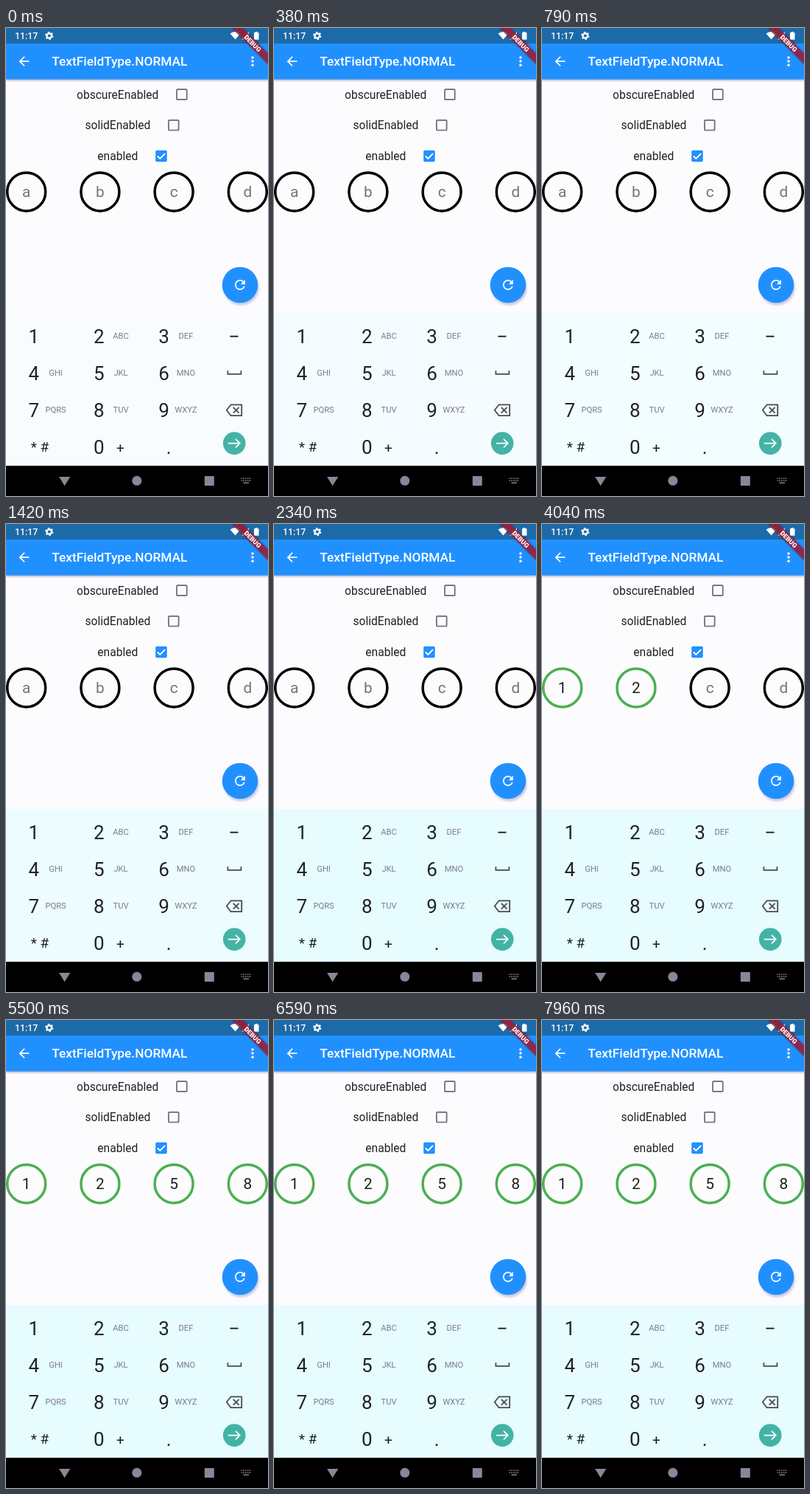
Recreate the animation shown at these times as an HTML page. Size 356 by 634 pixels, loop 8000 ms.

```html
<!DOCTYPE html>
<html lang="en">
<head>
<meta charset="utf-8">
<title>Code entry</title>
<style>
html, body { margin: 0; width: 100%; height: 100%; overflow: hidden; background: #fcfcff; }
svg { display: block; width: 100vw; height: 100vh; font-family: Roboto, sans-serif; fill: #212121; }
.mid { text-anchor: middle; }
.white { fill: #fff; }
.label { font-size: 15.59px; }
.box { fill: none; stroke: #69657c; stroke-width: 1.7; }
.line { fill: none; stroke: #fff; stroke-width: 1.8; }
.ring { fill: none; stroke-width: 3.46; }
.field { font-size: 20.8px; }
.digit { font-size: 26px; }
.letters { font-size: 11.2px; fill: #7c798b; }
.symbol { font-size: 19px; }
.key-icon { fill: none; stroke: #4c4a50; stroke-width: 1.8; }
.nav { fill: #88869a; }
#pad { animation: tint 8s linear infinite; }
@keyframes tint {
  0% { fill: #f8fcff; }
  10% { fill: #f2fdff; }
  25%, 100% { fill: #e6fcff; }
}
</style>
</head>
<body>
<svg viewBox="0 0 356 634">
  <defs>
    <filter id="soft" x="-30%" y="-30%" width="160%" height="160%"><feGaussianBlur stdDeviation="1.6"/></filter>
  </defs>
  <rect width="356" height="634" fill="#fcfcff"/>

  <!-- app bar -->
  <rect y="64" width="356" height="7" fill="#a9a6bd" filter="url(#soft)"/>
  <rect width="356" height="69.5" fill="#2190ff"/>
  <rect width="356" height="21" fill="#1d6aa8"/>
  <text class="white" x="12" y="14.8" font-size="12.3" font-weight="500">11:17</text>
  <g fill="none" stroke="#fff">
    <circle cx="58.7" cy="10.5" r="3.2" stroke-width="2.2"/>
    <circle cx="58.7" cy="10.5" r="4.8" stroke-width="1.6" stroke-dasharray="2.5 2.527"/>
  </g>
  <g class="white">
    <path d="M304.5 7.5Q311.5 2.5 318.5 7.5L311.5 15.5Z"/>
    <path d="M320 15.5L330 5V15.5Z"/>
    <path d="M337 6.2H338.7V5H341.6V6.2H343.5V15.8H337Z"/>
    <path transform="translate(14.1 34.8) scale(.866)" d="M20 11H7.83l5.59-5.59L12 4l-8 8 8 8 1.41-1.41L7.83 13H20z"/>
    <circle cx="335" cy="39.9" r="1.75"/><circle cx="335" cy="45.1" r="1.75"/><circle cx="335" cy="50.3" r="1.75"/>
    <text x="62.3" y="51.3" font-size="17.3" font-weight="500">TextFieldType.NORMAL</text>
  </g>
  <g transform="translate(356 0) rotate(45) scale(.866)">
    <rect x="-40" y="28" width="80" height="12" fill="#000" opacity=".35" filter="url(#soft)"/>
    <rect x="-40" y="28" width="80" height="12" fill="#a51f38" opacity=".82"/>
    <text class="mid white" y="37.6" font-size="10.2" font-weight="900">DEBUG</text>
  </g>

  <!-- options -->
  <g class="label">
    <text x="96" y="95.6">obscureEnabled</text>
    <text x="107.5" y="137.2">solidEnabled</text>
    <text x="124.3" y="178.8">enabled</text>
  </g>
  <rect class="box" x="232" y="83.2" width="13.7" height="13.7" rx="1"/>
  <rect class="box" x="220.9" y="124.8" width="13.7" height="13.7" rx="1"/>
  <rect x="203.2" y="165.7" width="15.5" height="15.5" rx="1.6" fill="#2190ff"/>
  <path class="line" d="M205.8 173.5L209.3 177L216 170.1"/>

  <g id="fields" class="mid field"></g>

  <!-- refresh button -->
  <circle cx="319.5" cy="351.5" r="24" fill="#c9c5e0" filter="url(#soft)"/>
  <circle cx="318" cy="348" r="24.3" fill="#2190ff"/>
  <path class="white" transform="translate(307.6 337.6) scale(.866)" d="M17.65 6.35C16.2 4.9 14.21 4 12 4c-4.42 0-7.99 3.58-7.99 8s3.57 8 7.99 8c3.73 0 6.84-2.55 7.73-6h-2.08c-.82 2.33-3.04 4-5.65 4-3.31 0-6-2.69-6-6s2.69-6 6-6c1.66 0 3.14.69 4.22 1.78L13 11h7V4z"/>

  <!-- keyboard -->
  <rect id="pad" y="386" width="356" height="207"/>
  <g id="keys" class="mid"></g>
  <g class="mid symbol">
    <text x="46" y="574.3">* #</text>
    <text x="155.5" y="574.6">+</text>
  </g>
  <text class="mid digit" x="221.3" y="577">.</text>
  <rect x="304.5" y="416.8" width="11" height="1.9"/>
  <path class="key-icon" d="M301.4 464.3V468.8H319.4V464.3"/>
  <path class="key-icon" d="M305.5 510.3H320.2V525.1H305.5L299.8 517.7ZM308.8 513.8L316.6 521.6M316.6 513.8L308.8 521.6"/>
  <circle cx="310.2" cy="562.6" r="15.3" fill="#43b3a6"/>
  <path class="line" d="M302 562.6H317.5M312 556.8L317.8 562.6L312 568.4"/>

  <!-- navigation bar -->
  <rect y="593" width="356" height="41" fill="#000"/>
  <g class="nav">
    <path d="M72 608H87.3L79.6 620.3Z"/>
    <circle cx="177.8" cy="613.3" r="6.5"/>
    <rect x="269.8" y="607" width="13" height="13" rx="1"/>
  </g>
  <path fill="none" stroke="#88869a" stroke-width="1.6" stroke-dasharray="1.6 1.2" d="M319.5 610.3H333M319.5 613.2H333"/>
  <path stroke="#88869a" stroke-width="1.5" d="M322.5 616.2H330"/>
</svg>
<script>
const LOOP = 8000;
const fields = [
  { hint: 'a', digit: '1', at: 2860 },
  { hint: 'b', digit: '2', at: 3500 },
  { hint: 'c', digit: '5', at: 4380 },
  { hint: 'd', digit: '8', at: 4920 }
];

function add(parent, tag, attrs, text = '') {
  const node = document.createElementNS('http://www.w3.org/2000/svg', tag);
  for (const name in attrs) node.setAttribute(name, attrs[name]);
  node.textContent = text;
  return parent.appendChild(node);
}

const fieldLayer = document.getElementById('fields');
fields.forEach((field, i) => {
  const x = 27.7 + i * 100.2;
  field.ring = add(fieldLayer, 'circle', { class: 'ring', cx: x, cy: 221.9, r: 26 });
  field.text = add(fieldLayer, 'text', { x, y: 229.4 });
});

const keyLayer = document.getElementById('keys');
const letters = ['', 'ABC', 'DEF', 'GHI', 'JKL', 'MNO', 'PQRS', 'TUV', 'WXYZ'];
function addKey(digit, column, row, label) {
  const x = 37.8 + column * 88.4, y = 417.3 + row * 50.2;
  add(keyLayer, 'text', { class: 'digit', x, y: y + 9.3 }, digit);
  add(keyLayer, 'text', { class: 'letters', x: x + 29.8, y: y + 3.6 }, label);
}
letters.forEach((label, i) => addKey(i + 1, i % 3, Math.floor(i / 3), label));
addKey(0, 1, 3, '');

function draw(now) {
  const time = now % LOOP;
  for (const { hint, digit, at, ring, text } of fields) {
    const filled = time >= at;
    ring.setAttribute('stroke', filled ? '#4caf50' : '#000');
    text.setAttribute('fill', filled ? '#212121' : '#757575');
    text.textContent = filled ? digit : hint;
  }
  requestAnimationFrame(() => draw(performance.now()));
}
draw(performance.now());
</script>
</body>
</html>
```
